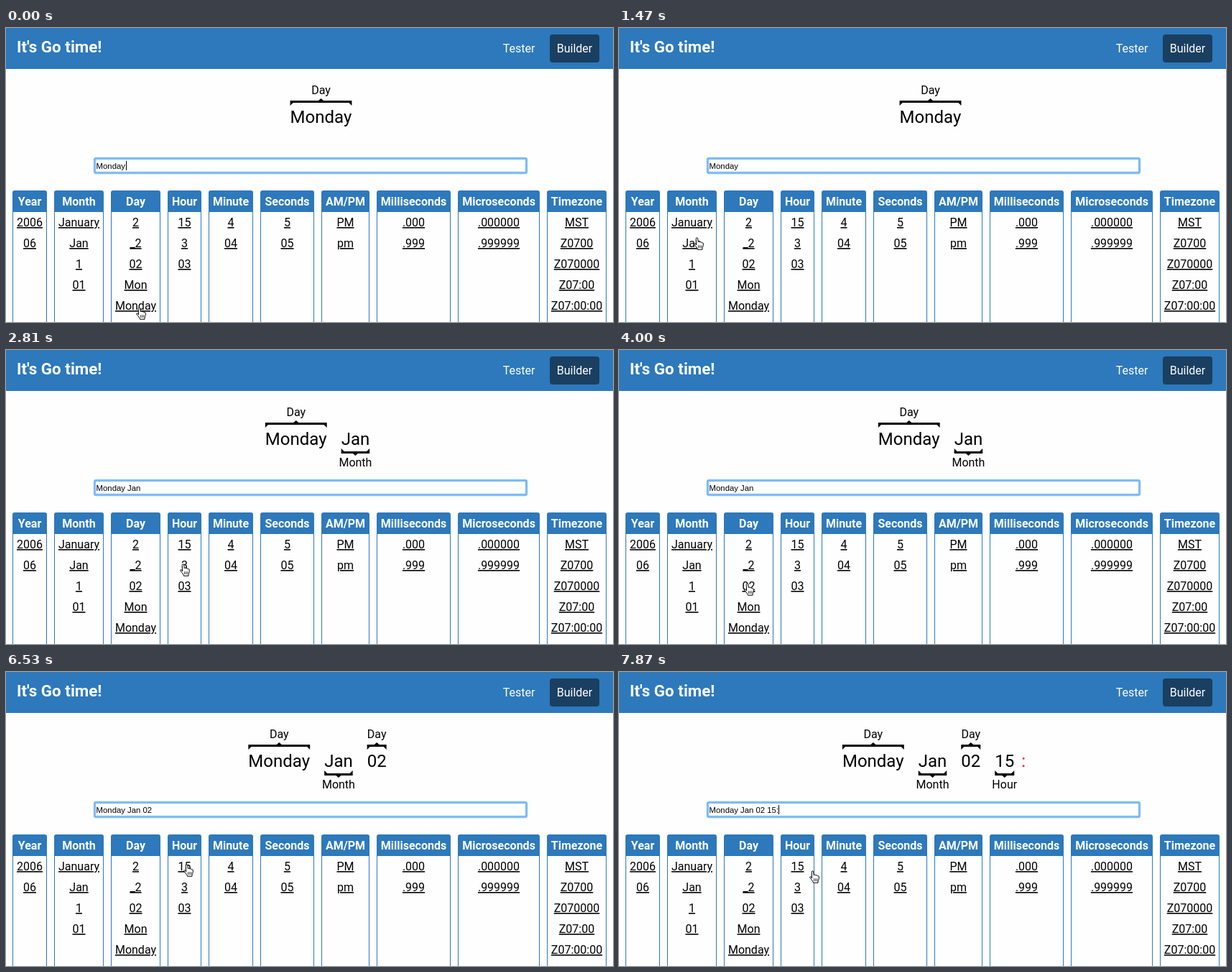
Animation, 845 px wide and 409 px high, one loop 8 s. Source, as an HTML page:

```html
<!DOCTYPE html>
<html lang="en">
<head>
<meta charset="utf-8">
<title>It's Go time!</title>
<style>
html, body { margin: 0; width: 100%; height: 100%; overflow: hidden; background: #fefefe; }
svg { display: block; font: 16px Roboto, sans-serif; }
text { white-space: pre; }
.mid { text-anchor: middle; }
.bold { font-weight: 700; fill: #fff; }
.link { text-decoration: underline; }
.word { font-size: 24px; }
.field { font: 11.35px "Liberation Sans", Arial, sans-serif; }
</style>
</head>
<body>
<svg id="stage" width="845" height="409" viewBox="0 0 845 409">
  <rect width="845" height="57" fill="#2d79bb"/>
  <text class="bold" x="15" y="34" font-size="22.4">It's Go time!</text>
  <text class="mid" x="714" y="34" fill="#fff">Tester</text>
  <rect x="757" y="9" width="69" height="39" rx="4" fill="#1a3f61"/>
  <text class="mid" x="791.5" y="34" fill="#fff">Builder</text>
  <g id="preview"></g>
  <rect x="123.5" y="181.5" width="601" height="20" fill="#fff" stroke="#b9b9b9"/>
  <g id="ring" fill="none">
    <rect x="123.5" y="181.5" width="601" height="20" rx="2" stroke="#b8dafb" stroke-width="4"/>
    <rect x="123.5" y="181.5" width="601" height="20" rx="1" stroke="#6bb1f5" stroke-width="2"/>
  </g>
  <text id="value" class="field" x="125.6" y="196"></text>
  <rect id="caret" y="185" width="1" height="13"/>
  <g id="table"></g>
  <g id="hand" stroke="#000" stroke-linejoin="round" stroke-linecap="round">
    <path fill="#fff" d="M3.6 10.6L3.2 2.4C3 .4 5.4 .3 5.7 2L6.3 6.6C6.6 5.6 8.4 5.7 8.7 7C9.2 6.2 10.8 6.4 11.1 7.8C11.7 7.2 13.2 7.5 13.3 9C13.5 11 13.3 12.3 12.6 13.6C12.1 14.5 12 15.3 12 17.2H5.5C5.4 15.6 4 14.3 3 12.9C2.2 11.7 1 10.6 .7 9.7C.5 8.5 2.2 8.4 3 9.5Z"/>
    <path fill="none" stroke-width=".8" d="M6.6 11.6v3M8.7 11.6v3M10.8 11.6v3"/>
  </g>
</svg>
<script>
const LOOP = 8000, TICK = 147;
const $ = id => document.getElementById(id);

function add(parent, tag, attrs, text) {
  const el = document.createElementNS("http://www.w3.org/2000/svg", tag);
  for (const k in attrs) el.setAttribute(k, attrs[k]);
  if (text !== undefined) el.textContent = text;
  parent.appendChild(el);
  return el;
}

// left, right, heading, choices
const columns = [
  [9, 57, "Year", "2006 06"],
  [67, 136, "Month", "January Jan 1 01"],
  [146, 215, "Day", "2 _2 02 Mon Monday"],
  [225, 272, "Hour", "15 3 03"],
  [282, 344, "Minute", "4 04"],
  [354, 429, "Seconds", "5 05"],
  [439, 506, "AM/PM", "PM pm"],
  [516, 619, "Milliseconds", ".000 .999"],
  [629, 743, "Microseconds", ".000000 .999999"],
  [753, 836, "Timezone", "MST Z0700 Z070000 Z07:00 Z07:00:00"]
];
for (const [l, r, head, items] of columns) {
  const x = (l + r) / 2, g = $("table");
  add(g, "path", { d: `M${l + .5} 250V409M${r - .5} 250V409`, stroke: "#2d79bb" });
  add(g, "path", { d: `M${l} 256V229q0-3 3-3H${r - 3}q3 0 3 3V256Z`, fill: "#2d79bb" });
  add(g, "text", { class: "mid bold", x, y: 247 }, head);
  items.split(" ").forEach((s, i) =>
    add(g, "text", { class: "mid link", x, y: 276 + 29 * i }, s));
}

// text, width, gap before, label, label side
const words = [
  ["Monday", 85.8, 0, "Day", "top"],
  ["Jan", 39.5, 20, "Month", "bottom"],
  ["02", 27, 20, "Day", "top"],
  ["15", 27, 20, "Hour", "bottom"],
  [":", 5.8, 10]
];

// time, field text, words shown, caret x
const edits = [
  [0, "Monday", 1, 167],
  [440, "Monday ", 1, 170],
  [1770, "Monday Jan", 2, 187],
  [2370, "Monday Jan ", 2, 190],
  [4140, "Monday Jan 02", 3, 203],
  [5040, "Monday Jan 02 ", 3, 206],
  [7130, "Monday Jan 02 15", 4, 219],
  [7580, "Monday Jan 02 15:", 5, 222]
];
const caretFlips = [0, 1030, 1770, 2810, 3400, 3850, 4140, 4740, 5040, 5630, 6080, 6530, 7130];
const blurs = [[1620, 1770], [6980, 7130]];

// time, ticks, target x, target y
const moves = [
  [0, 1, 181, 388],
  [150, 8, 106, 292],
  [1320, 1, 104, 291],
  [1620, 1, 100, 297],
  [2370, 4, 242, 297],
  [2960, 4, 190, 299],
  [3550, 3, 174, 324],
  [5190, 7, 246, 265],
  [6530, 1, 247, 267],
  [7870, 1, 265, 276]
];

function bracket(l, r, side) {
  const c = (l + r) / 2, y = v => side === "top" ? v : 245 - v;
  return [[l, 101], [c - 3.5, 101], [c, 98], [c + 3.5, 101], [r, 101], [r, 108],
    [r - 4, 104], [l + 4, 104], [l, 108]].map(([x, v]) => x + "," + y(v)).join(" ");
}

function drawPreview(count, trailing) {
  const g = $("preview"), shown = words.slice(0, count);
  g.textContent = "";
  const total = shown.reduce((sum, [, w, gap]) => sum + w + gap, trailing ? 10 : 0);
  let x = 438.5 - total / 2;
  for (const [text, w, gap, label, side] of shown) {
    x += gap;
    add(g, "text", { class: "word", x, y: 132, fill: label ? "#000" : "#f00" }, text);
    if (label) {
      add(g, "polygon", { points: bracket(x, x + w, side) });
      add(g, "text", { class: "mid", x: x + w / 2, y: side === "top" ? 92 : 162 }, label);
    }
    x += w;
  }
}

const ease = p => p * p * (3 - 2 * p);

function handAt(t) {
  let x = 181, y = 388;
  for (const [at, n, tx, ty] of moves) {
    if (t < at) break;
    const p = ease(Math.min(1, (1 + Math.floor((t - at) / TICK)) / n));
    x += (tx - x) * p;
    y += (ty - y) * p;
  }
  return [x, y];
}

let current;
function render(t) {
  const edit = edits.filter(e => e[0] <= t).pop();
  if (edit !== current) {
    current = edit;
    const [, text, count, caretX] = edit;
    $("value").textContent = text;
    $("caret").setAttribute("x", caretX);
    drawPreview(count, text.endsWith(" "));
  }
  const focused = !blurs.some(([a, b]) => t >= a && t < b);
  const caretOn = caretFlips.filter(f => f <= t).length % 2 === 1;
  $("ring").style.visibility = focused ? "visible" : "hidden";
  $("caret").style.visibility = focused && caretOn ? "visible" : "hidden";
  $("hand").setAttribute("transform", `translate(${handAt(t).map(Math.round)})`);
}

const start = performance.now();
function frame(now) {
  render(Math.max(0, now - start) % LOOP);
  requestAnimationFrame(frame);
}
render(0);
requestAnimationFrame(frame);
</script>
</body>
</html>
```
